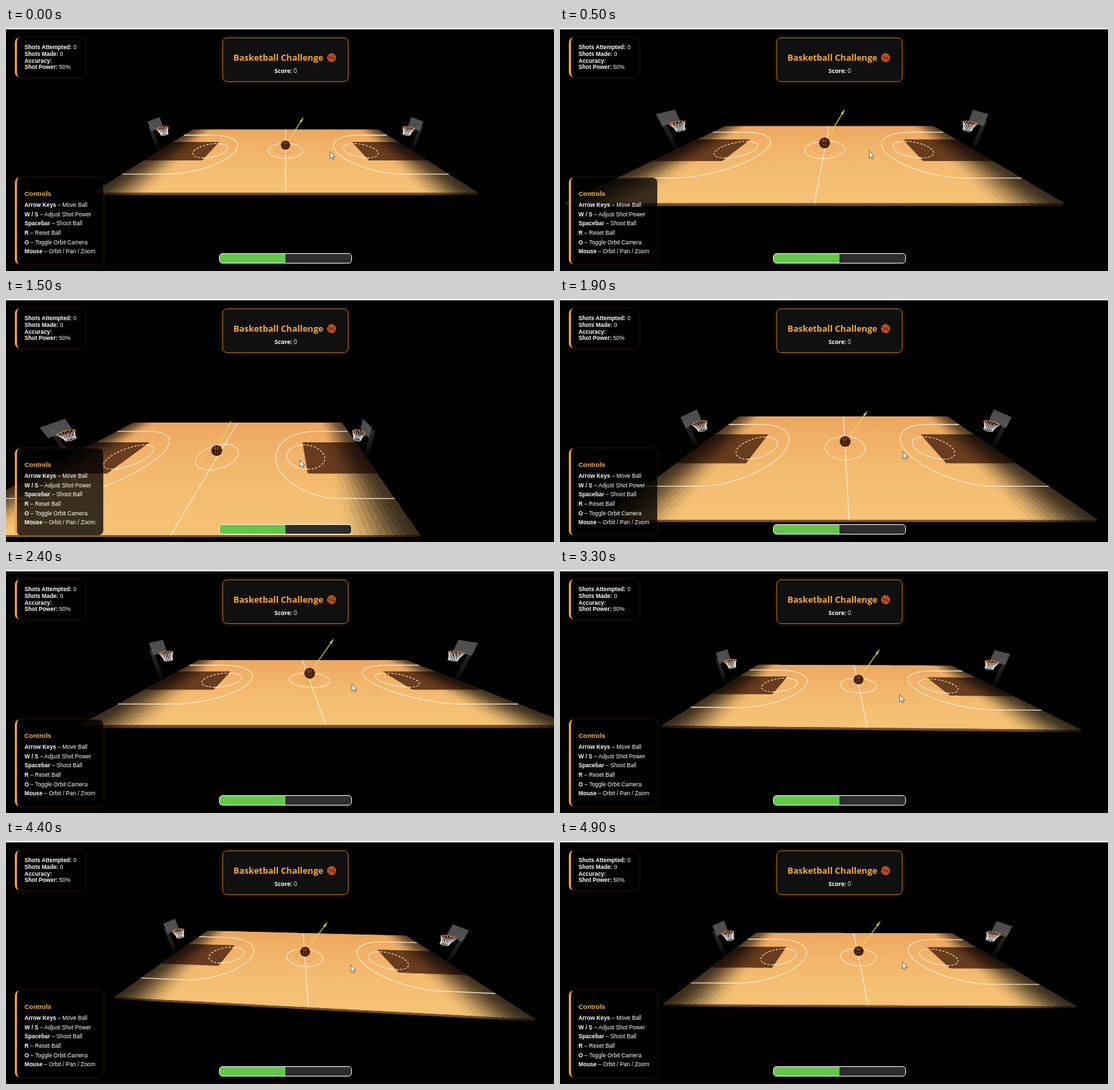
Write an HTML page with a canvas that moves like this. It is 800 by 356 pixels and loops after 5 s.

```html
<!DOCTYPE html>
<html lang="en">
<head>
<meta charset="utf-8">
<title>Basketball Challenge</title>
<style>
  html, body { margin: 0; width: 100%; height: 100%; overflow: hidden; background: #000; }
  canvas, svg { position: absolute; left: 0; top: 0; width: 800px; height: 356px; }
  .box { position: absolute; box-sizing: border-box; }
  .panel {
    left: 13px; border-left: 3px solid #f2a53c; border-radius: 7px;
    background: rgba(0, 0, 0, .76); box-shadow: 0 0 5px rgba(255, 150, 40, .2);
  }
  #stats { top: 14px; width: 102px; height: 58px; }
  #help { top: 219px; width: 129px; height: 127px; }
  #card {
    left: 316px; top: 14px; width: 184px; height: 65px; border: 1px solid #a8671f;
    border-radius: 7px; background: #101010; box-shadow: 0 0 6px rgba(255, 150, 40, .25);
  }
  #bar {
    left: 311px; top: 330px; width: 194px; height: 15px; border: 1.5px solid #f4f4f4;
    border-radius: 5px; background: linear-gradient(90deg, #62c847 50%, #2d2d2d 50%);
  }
  #strip { left: 0; top: 0; width: 800px; height: 1.5px; background: #e9eaea; }
  text { font: 8.3px "Liberation Sans", Arial, sans-serif; fill: #fff; }
  .b { font-weight: 700; }
  .head { font-size: 9.5px; font-weight: 700; fill: #f8b94a; }
  .ui { font-family: "Open Sans", "Noto Sans", sans-serif; font-size: 8.6px; }
  .title { font-size: 12.6px; font-weight: 700; fill: #f5a742; }
</style>
</head>
<body>
<canvas id="view" width="800" height="356"></canvas>
<div class="box" id="strip"></div>
<div class="box panel" id="stats"></div>
<div class="box panel" id="help"></div>
<div class="box" id="card"></div>
<div class="box" id="bar"></div>
<svg viewBox="0 0 800 356">
  <g id="lines"></g>
  <text class="head" x="27" y="246">Controls</text>
  <text class="ui title" x="332" y="47.8">Basketball Challenge</text>
  <text class="ui" x="392" y="66.2"><tspan class="b">Score:</tspan> 0</text>
  <g transform="translate(475.3 43.3)" fill="none" stroke="#4a1c12" stroke-width=".8">
    <circle r="6.6" fill="#cf5528" stroke="none"/>
    <path d="M-6 -2Q0 1 6 2M-2 6Q0 0 2 -6"/>
    <path id="seam" d="M-5 4Q-1 -1 -4 -5"/>
    <use href="#seam" transform="rotate(180)"/>
  </g>
  <path id="mouse" d="M0 0V10.4L2.4 8.2L4 11.8L5.7 11L4.1 7.6H7.3Z" fill="#fff" stroke="#333" stroke-width=".7"/>
</svg>
<script>
const g = document.getElementById('view').getContext('2d');
const mouse = document.getElementById('mouse');

function textRows(rows, y, step) {
  document.getElementById('lines').innerHTML += rows.map(([a, b], i) =>
    `<text x="27" y="${y + i * step}"><tspan class="b">${a}</tspan> ${b}</text>`).join('');
}
textRows([['Shots Attempted:', '0'], ['Shots Made:', '0'], ['Accuracy:', ''], ['Shot Power:', '50%']], 31, 9.8);
textRows([['Arrow Keys', '– Move Ball'], ['W / S', '– Adjust Shot Power'], ['Spacebar', '– Shoot Ball'],
  ['R', '– Reset Ball'], ['O', '– Toggle Orbit Camera'], ['Mouse', '– Orbit / Pan / Zoom']], 262.2, 13.6);

// each row: time, then values
const PAN = [ // court centre in camera space: x, y, depth
  [0, 0, .05, 19.1],
  [400, 0, .05, 16.3],
  [600, -3, .3, 16.25],
  [1000, -8.76, 1.22, 16.2],
  [1200, -8.76, 1, 16.2],
  [1500, -6.9, -3.51, 16.28],
  [1800, .2, -3.4, 16.3],
  [2400, 2.45, 1.36, 16.4],
  [2700, 2.45, 1.36, 16.4],
  [3000, 2.13, .87, 18.1],
  [3300, 2.13, .87, 18.1],
  [3900, 2.2, .63, 17.68],
  [4800, 2.13, .82, 18]
];
const ORBIT = [ // azimuth, pitch
  [0, 0, 26.57],
  [2700, 0, 26.57],
  [3000, .9, 27],
  [3300, .9, 27],
  [3600, 1.5, 33],
  [3900, 3.6, 51.5],
  [4200, 6, 38],
  [4400, 4, 31.5],
  [4800, .6, 30.7],
  [4900, .4, 31]
];
const POINTER = [
  [0, 473, 181],
  [400, 473, 181],
  [1000, 344, 176],
  [1200, 346, 178],
  [1500, 429, 236],
  [1800, 500, 235],
  [2400, 505, 167],
  [3300, 496, 183],
  [3900, 497, 190],
  [4200, 505, 184],
  [4800, 500, 177]
];
const LOOP = 5000, STEP = 100, FOCAL = 232.6, TAU = Math.PI * 2;
let cam;

function at(track, t) {
  const i = track.findIndex(k => k[0] > t);
  if (i < 0) return track[track.length - 1].slice(1);
  const a = track[i - 1], b = track[i], u = (t - a[0]) / (b[0] - a[0]);
  return a.map((v, n) => v + (b[n] - v) * u).slice(1);
}

function setCamera(t) {
  const [az, pitch] = at(ORBIT, t).map(v => v * Math.PI / 180);
  const [x, y, depth] = at(PAN, t);
  cam = { sa: Math.sin(az), ca: Math.cos(az), sp: Math.sin(pitch), cp: Math.cos(pitch), x, y, depth };
}

// world (x right, y up, z towards the viewer) to [screen x, screen y, pixels per unit]
function project([x, y, z]) {
  const near = x * cam.sa + z * cam.ca;
  const s = FOCAL / (cam.depth - near * cam.cp - y * cam.sp);
  return [408 + (x * cam.ca - z * cam.sa + cam.x) * s, 179.5 - (y * cam.cp - near * cam.sp + cam.y) * s, s];
}

function trace(points, close) {
  g.beginPath();
  for (const p of points) { const [x, y] = project(p); g.lineTo(x, y); }
  if (close) g.closePath();
}
function fill(points, color) { trace(points, true); g.fillStyle = color; g.fill(); }
function line(points, color, width) { trace(points); g.strokeStyle = color; g.lineWidth = width; g.stroke(); }

function arc(cx, y, r, from, to, n = 40) {
  return Array.from({ length: n + 1 }, (_, i) => {
    const a = from + (to - from) * i / n;
    return [cx + Math.cos(a) * r, y, Math.sin(a) * r];
  });
}

// spotlights leave both ends of the floor dim
function light(x, z) {
  const e = Math.min(1, (15 - Math.abs(x)) / (4 + z / 10));
  const floor = .32 - z / 75;
  return floor + (1 - floor) * e * e * (3 - 2 * e);
}
function lit(rgb, x, z) {
  const b = light(x, z);
  return `rgb(${rgb.map(v => Math.round(v * b))})`;
}
const wood = z => [241 + z * .5, 180 + z * 2, 106 + z * 1.6];
const paint = () => [104, 60, 30];

// small cells, each reaching under the next one so that no seams show
function floorArea(x0, x1, z0, z1, nx, nz, color) {
  const dx = (x1 - x0) / nx, dz = (z1 - z0) / nz;
  for (let j = 0; j < nz; j++) for (let i = 0; i < nx; i++) {
    const x = x0 + i * dx, z = z0 + j * dz;
    const xr = Math.min(x1, x + dx * 2), zf = Math.min(z1, z + dz * 2);
    const mx = x + dx / 2, mz = z + dz / 2;
    fill([[x, 0, z], [xr, 0, z], [xr, 0, zf], [x, 0, zf]], lit(color(mz), mx, mz));
  }
}

function court() {
  floorArea(-15, 15, -7.5, 7.5, 75, 15, wood);
  for (let x = -15; x < 15; x += .5) {
    const r = Math.min(15, x + 1);
    fill([[x, 0, 7.5], [r, 0, 7.5], [r, -.2, 7.5], [x, -.2, 7.5]], lit([112, 78, 42], x + .25, 6));
  }
  floorArea(-15, -8.87, -2.45, 2.45, 20, 1, paint);
  floorArea(8.87, 15, -2.45, 2.45, 20, 1, paint);

  const white = 'rgba(255,240,214,.88)', h = Math.PI / 2;
  line([[0, 0, -7.5], [0, 0, 7.5]], white, 1.4);
  line(arc(0, 0, 2.03, 0, TAU), white, 1.2);
  line(arc(0, 0, 1, 0, TAU), 'rgba(196,120,54,.4)', .9);
  for (const s of [-1, 1]) {
    const flip = pts => pts.map(([x, y, z]) => [-s * x, y, z]);
    line(flip([[-15, 0, -4.98], ...arc(-10.9, 0, 4.98, -h, h), [-15, 0, 4.98]]), white, 1.3);
    line(flip(arc(-8.95, 0, 1.92, -h, h)), white, 1.2);
    g.setLineDash([3.2, 2.2]);
    line(flip(arc(-8.95, 0, 1.92, h, 3 * h)), white, 1.2);
    g.setLineDash([]);
  }
}

function hoop(s) {
  const foot = project([s * 15.15, 0, 0]), top = project([s * 15.15, 3, 0]);
  const fade = g.createLinearGradient(top[0], top[1], foot[0], foot[1]);
  fade.addColorStop(0, '#292929');
  fade.addColorStop(.6, '#1a1a1a');
  fade.addColorStop(1, '#050505');
  line([[s * 15.15, 0, 0], [s * 15.15, 3, 0]], fade, top[2] * .4);
  line([[s * 15.15, 2.9, 0], [s * 14.4, 2.9, 0]], '#242424', top[2] * .25);

  const x = s * 14.38, board = [[x, 2.7, -.88], [x, 3.77, -.88], [x, 3.77, .88], [x, 2.7, .88]];
  fill(board, 'rgba(92,92,92,.85)');
  line([...board, board[0]], 'rgba(120,120,120,.4)', .6);

  const cx = s * 13.82, n = 12, cord = 'rgba(255,255,255,.75)';
  const rim = arc(cx, 2.75, .56, 0, TAU, n), low = arc(cx, 2, .34, 0, TAU, n);
  line([[x, 2.75, 0], [cx + s * .5, 2.75, 0]], '#b9602a', 1.5);
  for (let i = 0; i < n; i++) {
    line([rim[i], low[(i + 2) % n]], cord, .8);
    line([rim[i], low[(i + n - 2) % n]], cord, .8);
  }
  line(low, cord, .7);
  line(arc(cx, 2.75, .56, 0, TAU), '#cf6c2e', 1.2);
}

function ball() {
  const [x, y, s] = project([0, .66, 0]), r = s * .54;
  g.save();
  g.translate(x, y);
  g.scale(r, r);
  g.beginPath();
  g.arc(0, 0, 1, 0, TAU);
  const skin = g.createRadialGradient(-.1, -.35, .1, 0, 0, 1);
  skin.addColorStop(0, '#8f4d28');
  skin.addColorStop(.6, '#6a341a');
  skin.addColorStop(1, '#321508');
  g.fillStyle = skin;
  g.fill();
  g.clip();
  g.strokeStyle = '#1d0d06';
  g.lineWidth = .12;
  g.beginPath();
  g.moveTo(-1, -.1);
  g.quadraticCurveTo(0, .25, 1, -.1);
  for (const k of [-.75, 0, .75]) {
    g.moveTo(k, -1);
    g.quadraticCurveTo(k * .2 - .1, 0, k, 1);
  }
  g.stroke();
  g.restore();
}

function aim() {
  const a = project([.25, 1.1, 0]), b = project([2, 4.05, 0]);
  const glow = g.createLinearGradient(a[0], a[1], b[0], b[1]);
  glow.addColorStop(0, '#f0c878');
  glow.addColorStop(.6, '#ecd94c');
  glow.addColorStop(1, '#b9dc58');
  line([[.25, 1.1, 0], [1.8, 3.7, 0]], glow, 1.2);
  const ux = b[0] - a[0], uy = b[1] - a[1], len = Math.hypot(ux, uy), k = 9 / len, w = 1.7 / len;
  g.beginPath();
  g.moveTo(b[0], b[1]);
  for (const s of [-w, w]) g.lineTo(b[0] - ux * k + uy * s, b[1] - uy * k - ux * s);
  g.fillStyle = glow;
  g.fill();
}

function draw(t) {
  setCamera(t);
  g.fillStyle = '#000';
  g.fillRect(0, 0, 800, 356);
  court();
  hoop(-1);
  hoop(1);
  aim();
  ball();
  mouse.setAttribute('transform', `translate(${at(POINTER, t).join(' ')})`);
}

const start = performance.now();
let last = -1;
function tick() {
  const t = Math.floor((performance.now() - start) % LOOP / STEP) * STEP;
  if (t !== last) draw(last = t);
  requestAnimationFrame(tick);
}
tick();
</script>
</body>
</html>
```
